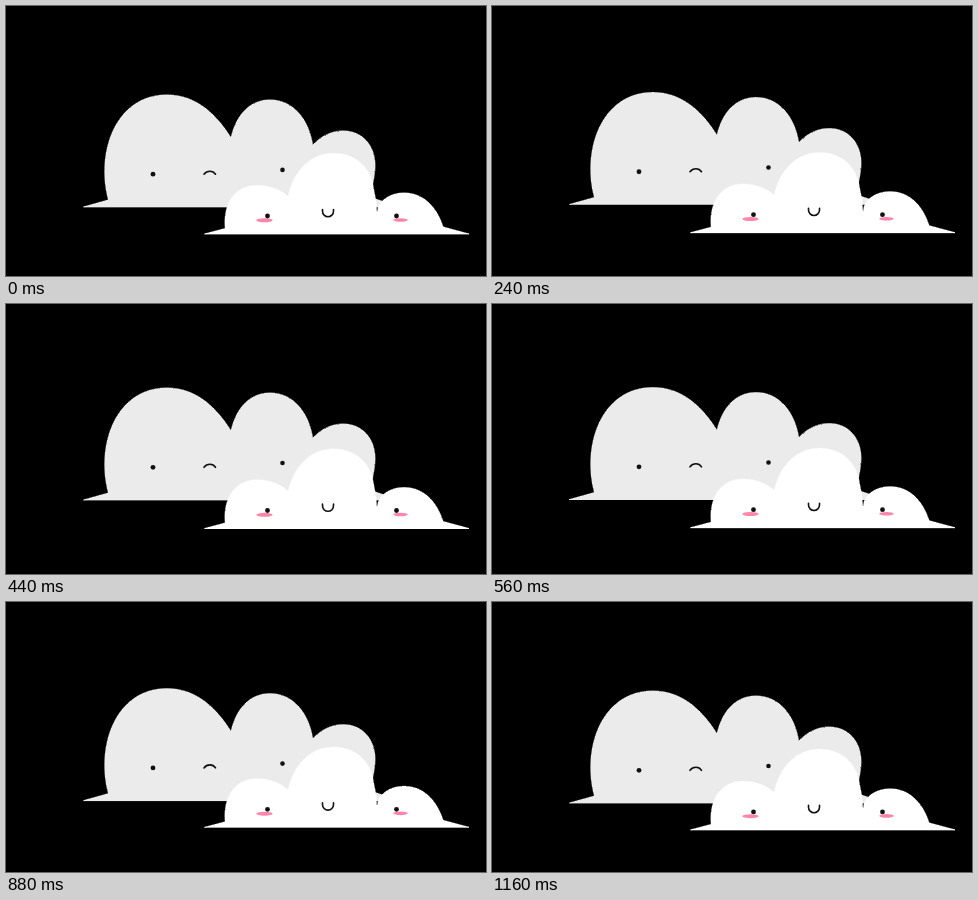
Animation of 480 by 270 pixels, one loop 1200 ms. Source, as an HTML page:

```html
<!DOCTYPE html>
<html lang="en">
<head>
<meta charset="utf-8">
<title>Bobbing clouds</title>
<style>
  html, body { margin: 0; width: 100%; height: 100%; overflow: hidden; background: #000; }
  svg { display: block; width: 100vw; height: 100vh; }
  .cloud { stroke-width: .8; stroke-linejoin: round; shape-rendering: crispEdges; }
  .gray { fill: #ebebeb; stroke: #ebebeb; }
  .white { fill: #fff; stroke: #fff; }
  .line { fill: none; stroke: #111; stroke-width: 1.6; stroke-linecap: round; }
  .eye { fill: #111; }
  .cheek { fill: #ff85ab; }
</style>
</head>
<body>
<svg viewBox="0 0 480 270">
  <g id="back">
    <path class="cloud gray" d="M300 201V148C310 132 324 125 337 125C356 125 369 139 369 160C369 168 367 175 366 182V201Z"/>
    <path class="cloud gray" d="M77.500 201L102.500 194C90 148 108.500 89 161 89C192 89 212 111 225 132C231 106 246 94 264 94C287 94 303 113 307 141L310 175L366 192L394 201Z"/>
    <circle class="eye" cx="147" cy="168.300" r="2.400"/>
    <circle class="eye" cx="276.500" cy="164" r="2.300"/>
    <path class="line" d="M198 168.300C201 164.300 207 164.300 209.500 168.300"/>
  </g>
  <g id="middle">
    <path class="cloud white" d="M281.500 194C287 163 306 147.500 327.500 147.500C350 147.500 364 162 367 180C368 187 370 192 370.500 205V223H281.500Z"/>
  </g>
  <g id="front">
    <path class="cloud white" d="M198.500 228L219.300 222.500C217 199 228 179.500 251 179.500C264 179.500 275 184 283 191.500L300 206H371.500C372 195 384 187 398 187C416 187 430 199 437 221L463 228Z"/>
    <ellipse class="cheek" cx="258.500" cy="214.300" rx="8.200" ry="2"/>
    <ellipse class="cheek" cx="394.500" cy="214" rx="7.200" ry="1.800"/>
    <circle class="eye" cx="261.500" cy="210" r="2.400"/>
    <circle class="eye" cx="390.500" cy="210" r="2.400"/>
    <path class="line" d="M316.500 203.500V205.300A5.500 5.500 0 0 0 327.500 205.300V203.500"/>
  </g>
</svg>
<script>
  const LOOP = 1200, STEP = 40;

  // lift: rise in pixels, peak: time of the highest point in ms
  const parts = [
    { id: 'back', lift: 5.5, peak: 555 },
    { id: 'middle', lift: 3.3, peak: 650 },
    { id: 'front', lift: 4.4, peak: 620 }
  ].map(p => ({ ...p, el: document.getElementById(p.id) }));

  const start = performance.now();

  function draw(now) {
    const elapsed = Math.max(0, now - start) % LOOP;
    const t = Math.floor(elapsed / STEP) * STEP;
    for (const { el, lift, peak } of parts) {
      const rise = (1 + Math.cos((t - peak) / LOOP * 2 * Math.PI)) / 2;
      el.setAttribute('transform', `translate(0 ${(-lift * rise).toFixed(3)})`);
    }
    requestAnimationFrame(draw);
  }
  draw(start);
</script>
</body>
</html>
```
